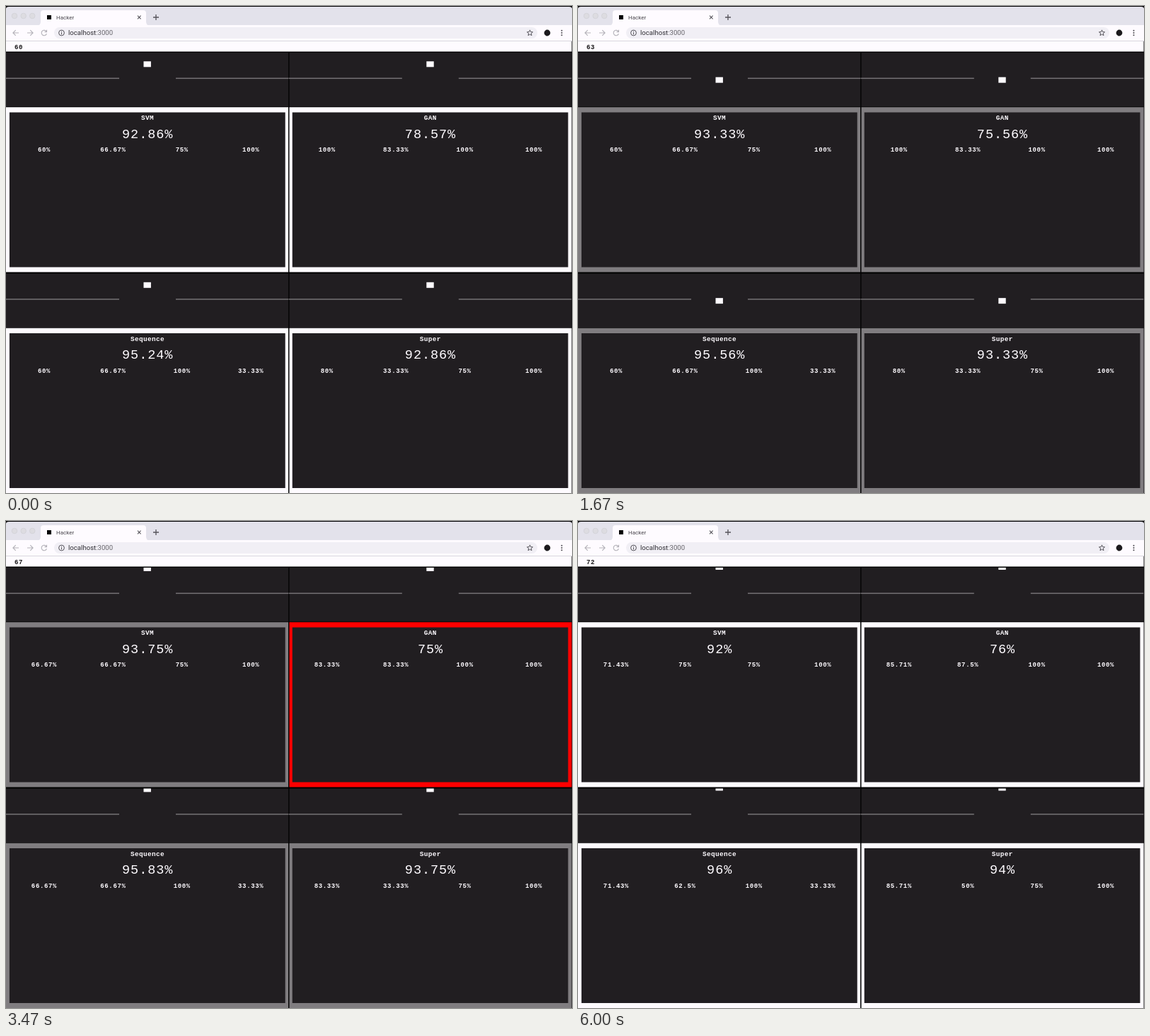
Recreate the animation shown at these times as an HTML page. Size 800 by 689 pixels, loop 6070 ms.

```html
<!DOCTYPE html>
<html lang="en">
<head>
<meta charset="utf-8">
<title>Hacker</title>
<style>
  html, body { margin: 0; width: 100%; height: 100%; overflow: hidden; background: #000; }
  svg { display: block; width: 100vw; height: 100vh; }
  text { white-space: pre; }
  .ui { font-family: Roboto, Arial, sans-serif; }
  .mono { font-family: "Liberation Mono", "Courier New", monospace; }
  .small { font-size: 9px; font-weight: 700; letter-spacing: .65px; }
  .name { font-size: 9.4px; font-weight: 700; letter-spacing: .4px; }
  .big { font-size: 18.5px; letter-spacing: .95px; }
  .panel text { fill: #fefbff; text-anchor: middle; }
</style>
</head>
<body>
<svg id="stage" viewBox="0 0 800 689" preserveAspectRatio="none">
  <defs>
    <clipPath id="lane"><rect x="0" y="0.5" width="399" height="76.5"/></clipPath>
  </defs>
  <rect width="800" height="689" fill="#000"/>

  <!-- browser window -->
  <path d="M0 28V4Q0 1 4 1H796Q800 1 800 4V28Z" fill="#e3e2eb"/>
  <g fill="#dddce1" stroke="#cfced4" stroke-width=".7">
    <circle cx="12" cy="14" r="3.8"/><circle cx="24.7" cy="14" r="3.8"/><circle cx="37.2" cy="14" r="3.8"/>
  </g>
  <path d="M44 27.5Q49 27.5 49 22V10Q49 6 53 6H194Q198 6 198 10V22Q198 27.5 203 27.5Z" fill="#fefbff"/>
  <rect y="27" width="800" height="22.5" fill="#fefbff"/>
  <rect x="58" y="13" width="6" height="6" fill="#000"/>
  <text class="ui" x="71" y="19" font-size="8" fill="#48464c">Hacker</text>
  <g fill="none" stroke="#55535a" stroke-width="1.1">
    <path d="M186 13.7L190.6 18.3M190.6 13.7L186 18.3"/>
    <path d="M208 16H216M212 12V20" stroke-width="1.3"/>
  </g>
  <g fill="none" stroke="#b3b1b8" stroke-width="1.1">
    <path d="M18 38H10M13.7 34.2L9.9 38L13.7 41.8"/>
    <path d="M30 38H38M34.3 34.2L38.1 38L34.3 41.8"/>
    <path d="M57 36A3.7 3.7 0 1 0 57.4 39.2M57.5 33.8V36.8H54.5"/>
  </g>
  <rect x="68" y="30" width="683" height="16" rx="8" fill="#f1eff5"/>
  <circle cx="78.5" cy="38" r="3.9" fill="none" stroke="#55535a"/>
  <path d="M78.5 37.4V40.3M78.5 35.6V36.6" stroke="#55535a"/>
  <text class="ui" x="88" y="41.2" font-size="9.6" fill="#302e34">localhost<tspan fill="#66646a">:3000</tspan></text>
  <path id="star" fill="none" stroke="#55535a" stroke-linejoin="round"/>
  <circle cx="765" cy="38" r="4.4" fill="#1c1a1d"/>
  <g fill="#48464c"><circle cx="785.5" cy="34.7" r="1"/><circle cx="785.5" cy="38" r="1"/><circle cx="785.5" cy="41.3" r="1"/></g>

  <!-- page header -->
  <rect y="49" width="800" height="1" fill="#d9d7de"/>
  <rect id="head" y="50" width="799.5" height="14.5"/>
  <text id="count" class="mono small" x="12" y="60.5" fill="#151315"></text>
  <g id="panels"></g>
</svg>
<script>
const LOOP = 6070, STEP = 1000 / 15;
const FIRST = 60, START = -130, PERIOD = 509, MID = 260;
const WHITE = '#fefbff', GRAY = '#807d80', RED = '#ff0000', DARK = '#211e21';

// Tick -> gate under attack; every other tick is a normal packet.
const attacks = { 66: 0, 68: 1, 69: 0, 70: 1 };
const gateX = [40, 120, 280, 360], NORMAL_X = 199.7;

// score and gates are [right, seen]; wrong lists the misjudged ticks.
const models = [
  { name: 'SVM', score: [39, 42], gates: [[3, 5], [4, 6], [3, 4], [1, 1]], wrong: [67] },
  { name: 'GAN', score: [33, 42], gates: [[5, 5], [5, 6], [1, 1], [1, 1]], wrong: [60, 61, 65, 66] },
  { name: 'Sequence', score: [40, 42], gates: [[3, 5], [4, 6], [1, 1], [1, 3]], wrong: [68] },
  { name: 'Super', score: [39, 42], gates: [[4, 5], [2, 6], [3, 4], [1, 1]], wrong: [] }
];

const $ = id => document.getElementById(id);

function add(parent, tag, attrs, text) {
  const el = document.createElementNS('http://www.w3.org/2000/svg', tag);
  for (const key in attrs) el.setAttribute(key, attrs[key]);
  if (text) el.textContent = text;
  return parent.appendChild(el);
}

function set(el, attrs) {
  for (const key in attrs) el.setAttribute(key, attrs[key]);
}

const percent = ([right, seen]) => +(100 * right / seen).toFixed(2) + '%';

function buildPanel(model, i) {
  const g = add($('panels'), 'g', {
    class: 'panel',
    transform: `translate(${i % 2 * 399.8} ${65.5 + (i >> 1) * 312.5})`
  });
  const rect = (x, y, width, height, fill, parent = g) =>
    add(parent, 'rect', { x, y, width, height, fill });
  const label = (cls, x, y, text) => add(g, 'text', { class: 'mono ' + cls, x, y }, text);

  rect(i % 2 ? .7 : 0, .5, i % 2 ? 399 : 399.2, 76.5, DARK);
  rect(0, 36.1, 160, 1.5, '#757275');
  rect(240, 36.1, 159.4, 1.5, '#757275');
  const clip = add(g, 'g', { 'clip-path': 'url(#lane)' });
  const ball = rect(0, 0, 10.4, 8, WHITE, clip);
  const bar = rect(0, 34.5, 80, 5, WHITE);
  const border = rect(i % 2 ? .7 : 0, 77.7, i % 2 ? 399 : 399, 233.3, WHITE);
  rect(4.9, 85, 389.8, 219, DARK);
  label('name', 200, 95.8, model.name);
  const score = label('big', 200.2, 121.3);
  const gates = model.gates.map((_, k) => label('small', 54 + 97.4 * k, 140.7));
  return { ball, bar, border, score, gates };
}

const panels = models.map(buildPanel);

set($('star'), {
  d: 'M' + Array.from({ length: 10 }, (_, k) => {
    const r = k % 2 ? 1.9 : 4.3, a = k * Math.PI / 5;
    return (740.5 + r * Math.sin(a)).toFixed(2) + ' ' + (38.2 - r * Math.cos(a)).toFixed(2);
  }).join('L') + 'Z'
});

// Colour shown after a packet has been judged.
function verdict(model, tick) {
  const wrong = model.wrong.includes(tick);
  if (tick in attacks) return wrong ? RED : GRAY;
  return wrong ? GRAY : WHITE;
}

function drawPanel(model, panel, tick, age) {
  const attack = tick in attacks;
  const passed = age >= MID;
  const caught = attack && passed && !model.wrong.includes(tick);

  const score = [...model.score];
  const gates = model.gates.map(gate => [...gate]);
  const last = caught ? tick : tick - 1;
  for (let k = FIRST; k <= last; k++) {
    const tally = k in attacks ? gates[attacks[k]] : score;
    tally[1]++;
    if (!model.wrong.includes(k)) tally[0]++;
  }
  panel.score.textContent = percent(score);
  panel.gates.forEach((el, k) => { el.textContent = percent(gates[k]); });

  const x = attack ? gateX[attacks[tick]] : NORMAL_X;
  set(panel.ball, {
    x: x - 5.2,
    y: -8 + .16 * age,
    rx: attack ? 1.5 : 0,
    fill: attack ? RED : WHITE,
    visibility: caught ? 'hidden' : 'visible'
  });
  set(panel.bar, { x: x - 40, visibility: caught ? 'visible' : 'hidden' });
  set(panel.border, { fill: passed ? GRAY : verdict(model, tick - 1) });
}

function draw(ms) {
  const t = Math.floor((ms % LOOP + 5) / STEP) * STEP;
  const n = Math.floor((t - START) / PERIOD);
  const tick = FIRST + n;
  const age = t - START - n * PERIOD;

  $('count').textContent = tick;
  set($('head'), { fill: tick in attacks ? RED : WHITE });
  models.forEach((model, i) => drawPanel(model, panels[i], tick, age));
}

const begin = performance.now();
function loop() {
  draw(performance.now() - begin);
  requestAnimationFrame(loop);
}
loop();
</script>
</body>
</html>
```
